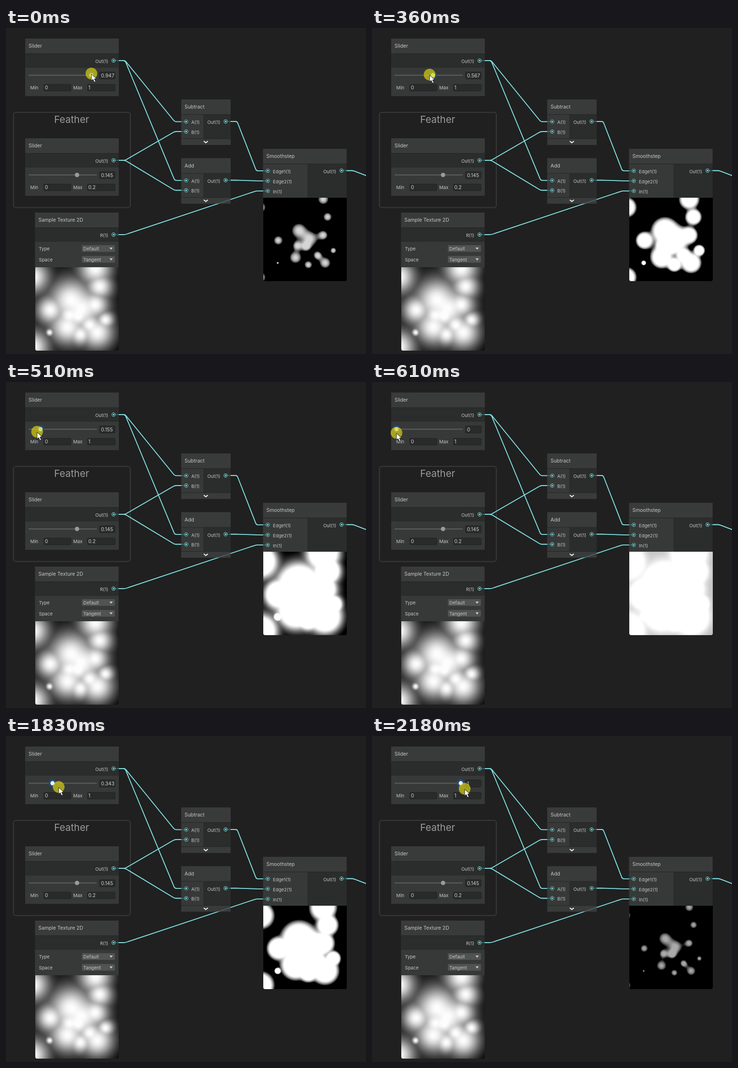
An HTML page with a canvas for the animation above (2390 ms loop, 750 px wide and 680 px high).

```html
<!DOCTYPE html>
<html lang="en">
<head>
<meta charset="utf-8">
<title>Node graph</title>
<style>
  html, body { margin: 0; width: 100%; height: 100%; overflow: hidden; background: #202020; }
  svg, canvas { position: absolute; display: block; }
  svg { left: 0; top: 0; }
  canvas { width: 174px; height: 174px; border-radius: 0 0 4px 4px; }
  #texture { left: 60.5px; top: 498.5px; }
  #preview { left: 535.5px; top: 354px; }
  text { font-family: Inter, Roboto, sans-serif; font-size: 9.6px; fill: #c6c6c6; }
  .title { font-size: 10.4px; }
  .value { font-size: 10.2px; fill: #d0d0d0; }
  .group { font-size: 20.4px; fill: #9a9a9a; }
  .wire { fill: none; stroke: #82e2e4; stroke-width: 1.8; stroke-linejoin: round; }
  .head { fill: #393b3a; }
  .side { fill: #373938; }
  .body { fill: #2b2d2c; }
  .field { fill: #292b2a; stroke: #222423; }
  .line { fill: #1f201f; }
  .track { fill: #5e605f; }
  .menu { fill: #515352; }
  .frame { fill: none; stroke: #383838; stroke-width: 2; }
</style>
</head>
<body>
<svg id="stage" width="750" height="680" viewBox="0 0 750 680"></svg>
<canvas id="texture" width="174" height="174"></canvas>
<canvas id="preview" width="174" height="174"></canvas>
<script>
const LOOP = 2390, FEATHER = 0.145, SIZE = 174;
const SLIDER = 22, FEATHER_SLIDER = 230, SUBTRACT = 149, ADD = 271.5;

const clamp = x => Math.min(1, Math.max(0, x));
const smooth = x => x * x * (3 - 2 * x);

// ---- Node graph ----
const rect = (cls, x, y, w, h, r = 0) =>
  `<rect class="${cls}" x="${x}" y="${y}" width="${w}" height="${h}" rx="${r}"/>`;
const text = (s, x, y, cls = "", anchor = "start", extra = "") =>
  `<text class="${cls}" x="${x}" y="${y}" text-anchor="${anchor}" ${extra}>${s}</text>`;
const circle = (x, y, r, fill, extra = "") =>
  `<circle cx="${x}" cy="${y}" r="${r}" fill="${fill}" ${extra}/>`;
const header = (name, x, y, w) =>
  rect("head", x, y, w, 32) + rect("line", x, y + 31.2, w, 0.8) + text(name, x + 7, y + 19.3, "title");

const port = ([x, y]) =>
  circle(x, y, 3.6, "#161818", 'stroke="#6fc9cc" stroke-width="1.1"') + circle(x, y, 1.8, "#84e4e7");
const input = (name, [x, y]) => port([x, y]) + text(name, x + 10.5, y + 4.8);
const output = (name, [x, y]) => port([x, y]) + text(name, x - 11, y + 5, "", "end");

const sliderOut = y => [224, y + 46];
const mathIn = (y, row) => [375.5, y + 46.4 + row * 20.6];
const mathOut = y => [457.5, y + 46];
const smoothIn = row => [545.5, 297.8 + row * 21];
const textureOut = [224, 431], smoothOut = [699, 297.5], offstage = [801, 318];

function wire([x1, y1], [x2, y2]) {
  const a = x1 + 24, b = x2 - 24, len = Math.hypot(b - a, y2 - y1);
  const dx = (b - a) / len * 4, dy = (y2 - y1) / len * 4;
  return `<path class="wire" d="M${x1},${y1}H${a - 3}Q${a},${y1} ${a + dx},${y1 + dy}` +
    `L${b - dx},${y2 - dy}Q${b},${y2} ${b + 3},${y2}H${x2}"/>`;
}

function sliderNode(y, max) {
  return header("Slider", 40, y, 195) + rect("body", 40, y + 32, 195, 29) +
    rect("side", 40, y + 61, 195, 59) + output("Out(1)", sliderOut(y)) +
    rect("track", 47, y + 75.5, 142, 2) + rect("field", 194.5, y + 69.5, 33, 15, 2) +
    text("Min", 50.5, y + 106) + rect("field", 78.5, y + 95.5, 57, 14, 2) +
    text("0", 81, y + 106, "value") +
    text("Max", 140, y + 106) + rect("field", 169.5, y + 95.5, 58, 14, 2) +
    text(max, 171.5, y + 106, "value");
}

function mathNode(name, y) {
  return header(name, 365, y, 103) + rect("side", 365, y + 32, 46, 51) +
    rect("body", 411, y + 32, 57, 51) + rect("head", 365, y + 82, 103, 13) +
    rect("line", 365, y + 81.5, 103, 0.8) +
    input("A(1)", mathIn(y, 0)) + input("B(1)", mathIn(y, 1)) + output("Out(1)", mathOut(y)) +
    `<path d="M412,${y + 87}l4.3,3.4 4.3,-3.4" fill="none" stroke="#eee" stroke-width="2"/>`;
}

const dropdown = (label, value, y) =>
  text(label, 68.5, y + 11) + rect("menu", 158, y, 69, 14, 2) +
  text(value, 161, y + 11) + `<path d="M215.5,${y + 5}h7l-3.5,4.5z" fill="#c8c8c8"/>`;

const textureNode = () => header("Sample Texture 2D", 60.5, 385, 174) +
  rect("body", 60.5, 417, 174, 29) + rect("side", 60.5, 446, 174, 53) +
  output("R(1)", textureOut) +
  dropdown("Type", "Default", 453) + dropdown("Space", "Tangent", 475.5);

const smoothNode = () => header("Smoothstep", 535.5, 252, 174) +
  rect("side", 535.5, 284, 92.5, 70) + rect("body", 628, 284, 81.5, 70) +
  ["Edge1(1)", "Edge2(1)", "In(1)"].map((name, row) => input(name, smoothIn(row))).join("") +
  output("Out(1)", smoothOut);

const wires = [SUBTRACT, ADD].map((y, row) =>
  wire(sliderOut(SLIDER), mathIn(y, 0)) + wire(sliderOut(FEATHER_SLIDER), mathIn(y, 1)) +
  wire(mathOut(y), smoothIn(row))).join("") +
  wire(textureOut, smoothIn(2)) + wire(smoothOut, offstage);

document.getElementById("stage").innerHTML =
  rect("frame", 15.5, 176, 243.5, 198.5, 5) + text("Feather", 136.7, 198.3, "group", "middle") +
  wires + sliderNode(SLIDER, "1") + sliderNode(FEATHER_SLIDER, "0.2") +
  mathNode("Subtract", SUBTRACT) + mathNode("Add", ADD) + textureNode() + smoothNode() +
  `<g opacity=".25">${wires}</g>` +
  text(FEATHER, 198, 311, "value") + circle(148, 306.5, 4.6, "#999b9a") +
  '<clipPath id="box"><rect x="194" y="91" width="33.5" height="16"/></clipPath>' +
  text("", 198, 103, "value", "start", 'id="amount" clip-path="url(#box)"') +
  `<g id="knob">${circle(0, 98.5, 8, "#1f4d80") + circle(0, 98.5, 4.4, "#f4f4f4")}</g>` +
  `<g id="pointer">${circle(0, 0, 12.2, "rgba(217,206,18,.7)")}` +
  '<path d="M0,1v14l3.3,-3 2.7,5.9 2.8,-1.2 -2.7,-5.7h4.5z" fill="#fff" stroke="#111" stroke-width=".9"/></g>';

// ---- Soft dots: centres grouped by spread ----
const DOTS = {
  28: [[74, 68], [97, 86]],
  24: [[67, 125], [129, 136], [125, 3], [-6, 20], [-6, 166]],
  19: [[31, 89], [134, 40], [125, 78]],
  16: [[71, 100], [89, 102], [113, 120], [94, 140]],
  13: [[146, 110]],
  5.5: [[30, 136]]
};
const dots = Object.entries(DOTS).flatMap(([spread, centres]) => centres.map(c => [...c, +spread]));
const bell = (x, y, [cx, cy, spread]) =>
  Math.exp(-((x - cx) ** 2 + (y - cy) ** 2) / spread ** 2);

// Linear brightness: dots melt together over one wide, dim glow.
const field = Float32Array.from({ length: SIZE * SIZE }, (_, i) => {
  const x = i % SIZE + 0.5, y = Math.floor(i / SIZE) + 0.5;
  const merged = Math.cbrt(dots.reduce((sum, dot) => sum + bell(x, y, dot) ** 3, 0));
  const glow = 0.36 * bell(x, y, [80, 90, 50]);
  return 0.98 * (1 - (1 - clamp(merged)) * (1 - glow));
});

const toScreen = x => 255 * (x <= 0.0031308 ? 12.92 * x : 1.055 * x ** (1 / 2.4) - 0.055);

function paint(id, shade) {
  const ctx = document.getElementById(id).getContext("2d");
  const image = ctx.createImageData(SIZE, SIZE);
  field.forEach((level, i) => {
    image.data.fill(toScreen(shade(level)), i * 4, i * 4 + 3);
    image.data[i * 4 + 3] = 255;
  });
  ctx.putImageData(image, 0, 0);
}

// ---- Motion: two stepped drags, the pointer running ahead of the knob ----
const stepped = (time, start, end, steps) =>
  clamp(Math.floor((time - start) / (end - start) * (steps - 1) + 1e-6) / (steps - 1));

function pose(time) {
  if (time < 250) return { value: 0.947, lead: 0, y: 95 };
  if (time < 1720) {
    const p = stepped(time, 250, 610, 8);
    return { value: 0.9133 * (1 - p) ** 1.4166, lead: -9 * Math.sin(Math.PI * p), y: 95 + 11 * smooth(p) };
  }
  const p = stepped(time, 1720, 1980, 6), nudge = time < 2180 ? 0 : 1;
  return {
    value: 0.021 + 0.979 * p ** 1.2136,
    lead: 4 + 3 * p + 8 * Math.sin(Math.PI * p) + nudge,
    y: 106 + 4 * p ** 3
  };
}

const amount = document.getElementById("amount");
const knob = document.getElementById("knob");
const pointer = document.getElementById("pointer");
let shown;

function render(time) {
  const { value, lead, y } = pose(time), knobX = 51 + 134 * value;
  knob.setAttribute("transform", `translate(${knobX})`);
  pointer.setAttribute("transform", `translate(${knobX + lead},${y})`);
  if (value === shown) return;
  shown = value;
  amount.textContent = +value.toFixed(3);
  paint("preview", level => smooth(clamp((level - value + FEATHER) / (2 * FEATHER))));
}

const start = performance.now();
function tick() {
  render((performance.now() - start) % LOOP);
  requestAnimationFrame(tick);
}

paint("texture", level => level);
tick();
</script>
</body>
</html>
```
